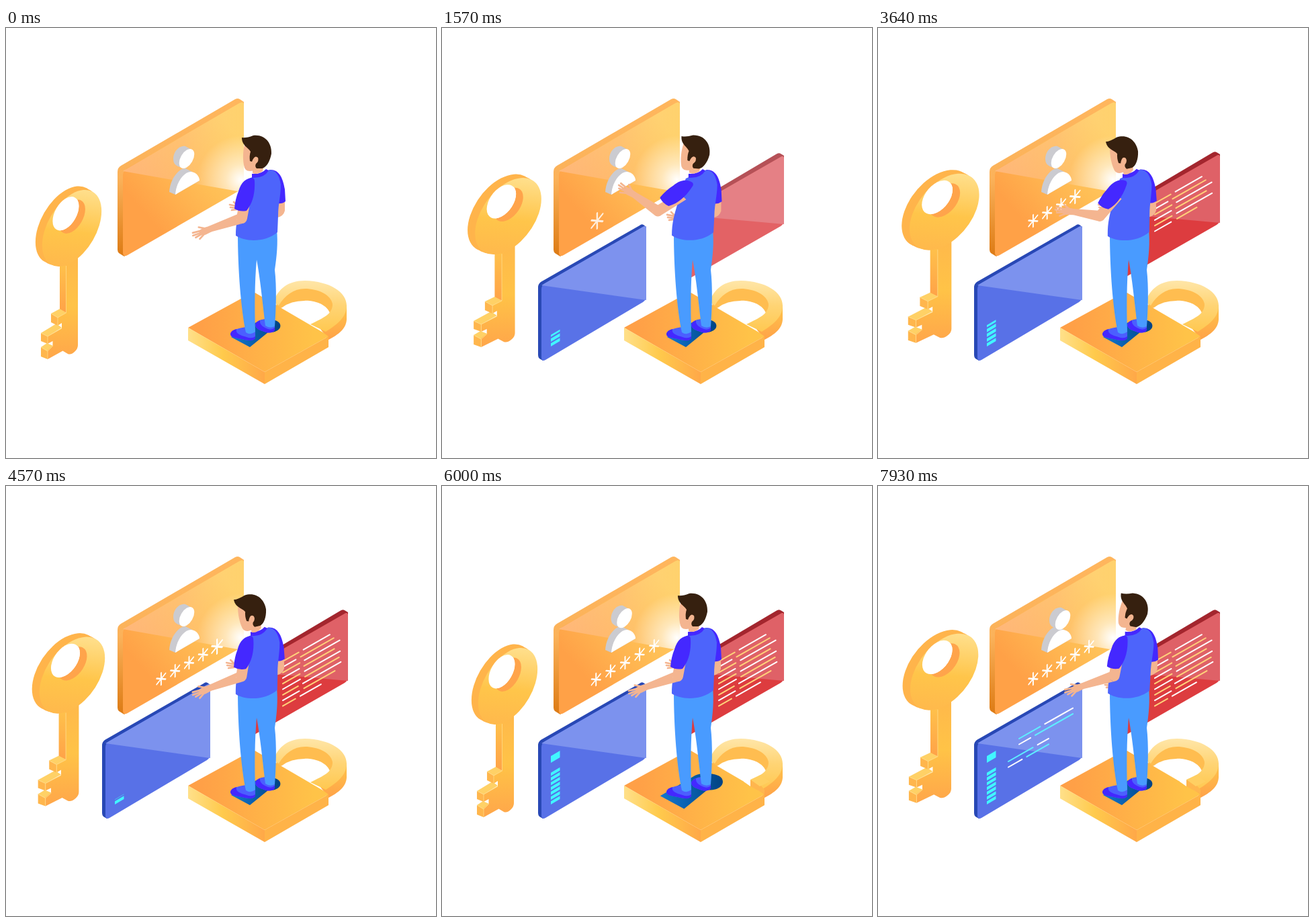
Recreate the animation shown at these times as an HTML page. Size 640 by 640 pixels, loop 8000 ms.

```html
<!DOCTYPE html>
<html lang="en">
<head>
<meta charset="utf-8">
<title>Access cards</title>
<style>
html, body { margin: 0; width: 100%; height: 100%; overflow: hidden; background: #fff; }
svg { display: block; width: 100vw; height: 100vh; }
.line { fill: none; stroke-width: 2; stroke-linecap: round; }
.skin { fill: #f4b590; }
.finger { fill: none; stroke: #f4b590; stroke-width: 2.7; stroke-linecap: round; }
.purple { fill: #4428ff; }
.jersey { fill: #4d64fb; }
.cyan { fill: #41f6ff; }
</style>
</head>
<body>
<svg viewBox="0 0 640 640">
  <defs>
    <linearGradient id="cardFace" gradientUnits="userSpaceOnUse" x1="185" y1="300" x2="345" y2="160">
      <stop offset=".15" stop-color="#ffa147"/><stop offset=".6" stop-color="#ffbe55"/><stop offset="1" stop-color="#ffd06a"/>
    </linearGradient>
    <linearGradient id="cardEdge" x1="0" y1="0" x2="0" y2="1">
      <stop offset="0" stop-color="#ffb65d"/><stop offset=".5" stop-color="#fbb25a"/><stop offset="1" stop-color="#dc7a14"/>
    </linearGradient>
    <radialGradient id="glow" gradientUnits="userSpaceOnUse" cx="350" cy="226" r="66">
      <stop offset="0" stop-color="#fff"/><stop offset=".35" stop-color="#fff" stop-opacity=".55"/><stop offset="1" stop-color="#fff" stop-opacity="0"/>
    </radialGradient>
    <linearGradient id="glare">
      <stop offset="0" stop-color="#ffc8ac" stop-opacity=".5"/><stop offset=".5" stop-color="#ffc090" stop-opacity=".42"/><stop offset="1" stop-color="#ffe08a" stop-opacity=".1"/>
    </linearGradient>
    <linearGradient id="keyFace" x1=".8" y1=".1" x2=".3" y2=".95">
      <stop offset="0" stop-color="#ffdf8c"/><stop offset=".55" stop-color="#ffc54a"/><stop offset="1" stop-color="#ffb94c"/>
    </linearGradient>
    <linearGradient id="shaft" x1="0" y1="0" x2="0" y2="1">
      <stop offset="0" stop-color="#ffb84b"/><stop offset=".5" stop-color="#ffc347"/><stop offset="1" stop-color="#ffa64a"/>
    </linearGradient>
    <linearGradient id="side" x1="0" y1="0" x2="0" y2="1">
      <stop offset="0" stop-color="#ffc64b"/><stop offset="1" stop-color="#ffa248"/>
    </linearGradient>
    <linearGradient id="lockTop">
      <stop offset=".1" stop-color="#ffa047"/><stop offset=".9" stop-color="#ffc348"/>
    </linearGradient>
    <linearGradient id="lockLeft">
      <stop offset="0" stop-color="#ffe08a"/><stop offset=".45" stop-color="#ffca4c"/><stop offset="1" stop-color="#ffa848"/>
    </linearGradient>
    <linearGradient id="shackleTop" x1="0" y1="0" x2="0" y2="1">
      <stop offset="0" stop-color="#ffe6a8"/><stop offset=".5" stop-color="#ffd474"/><stop offset="1" stop-color="#ffc850"/>
    </linearGradient>
    <linearGradient id="hole">
      <stop offset="0" stop-color="#1277d0"/><stop offset="1" stop-color="#004383"/>
    </linearGradient>
    <clipPath id="ringClip"><circle r="22.5"/></clipPath>
  </defs>

  <!-- profile card -->
  <path fill="url(#cardEdge)" d="M166 214Q166 208 171 205L341 106Q345 104 348 106L354 110V200L176 340L168 335Q166 333 166 330Z"/>
  <path fill="url(#cardFace)" d="M174 220Q174 213 180 209L347 112Q354 108 354 114V232Q354 238 349 241L181 338Q174 342 174 334Z"/>
  <path fill="url(#glare)" d="M174 213L347 112Q354 108 354 114V242L345 243Z"/>
  <path fill="url(#glow)" d="M174 213L347 112Q354 108 354 114V238L345 243Z"/>
  <path fill="#cbcbd0" d="M243 244C244 226 256 209 267 209L277 214L288 227L252 248Z"/>
  <path fill="#fff" d="M252 248C253 230 265 213 276 214C284 215 288 222 288 227Z"/>
  <g id="face">
    <path fill="#cbcbd0" d="M249 195C249 183 259 174 267 176L276 181L264 209L256 206Q249 203 249 195Z"/>
    <circle fill="#fff" r="13" transform="matrix(.866 -.5 0 1 269 194.5)"/>
  </g>
  <g id="stars" stroke="#fff" stroke-width="2.2" stroke-linecap="round"></g>

  <g id="key">
    <path fill="url(#side)" d="M80 340L90 350V424L80 419Z"/>
    <path fill="#ffd166" d="M67 425L80 418L90 424L77 431ZM52 454L75 440L83 446L62 459ZM52 475L61 469L70 473L62 481Z"/>
    <path fill="#ffb64d" d="M67 425L77 431V443L67 438ZM52 454L62 459V470L52 466ZM52 475L62 481V493L52 489Z"/>
    <path fill="url(#shaft)" d="M89.5 340V424L77 431V443L83 439V447L62 459V470L69.5 466V473L62 480V493L84.500 480.5L92 485Q97 487 103 481Q107 477 107 472V335Z"/>
    <path fill="none" stroke="#ffdc88" stroke-width=".8" d="M89.5 354V424L77 431V443M83 447L62 459V470M70 473L62 481V493M67 425L77 431M52 454L62 459M52 475L62 481"/>
    <g transform="matrix(.866 -.5 0 1 98 298)">
      <g fill="#ffb44b"><circle r="51.5" cx="-11" cy="-10.5"/><circle r="51.5" cx="-5.5" cy="-5"/></g>
      <circle r="51" fill="url(#keyFace)"/>
      <g transform="translate(.5 -17)">
        <circle r="22.5" fill="#ffa44b"/>
        <circle r="22.5" cx="-11" cy="-10" fill="#fff" clip-path="url(#ringShift)"/>
        <g clip-path="url(#ringClip)"><circle r="22.5" cx="-11" cy="-10" fill="#fff"/></g>
      </g>
    </g>
  </g>

  <g id="blueCard">
    <path fill="#2848b5" d="M143 386Q143 381 147 378L294 294Q297 291 300 293L304 296V390L150 495L145 492Q143 490 143 487Z"/>
    <path fill="#5871e7" d="M148 389Q148 383 153 380L299 296Q304 293 304 298V399Q304 405 299 408L154 494Q148 497 148 490Z"/>
    <path fill="#7c92ee" d="M148 383L299 296Q304 293 304 298V405Z"/>
    <g id="bars" class="cyan"></g>
    <path id="bigBar" class="cyan" d="M162 402L175.5 394V404L162 412Z"/>
    <g id="blueLines"></g>
  </g>

  <g id="redCard">
    <path fill="#a3262e" d="M350 273L497 186Q501 183 504 185L509 188V280L354 378H350Z"/>
    <path fill="#dd3c3f" d="M354 276L504 190Q509 187 509 193V284Q509 290 504 293L354 379Z"/>
    <path fill="#df6167" d="M354 276L504 190Q509 187 509 193V290Z"/>
    <g id="redLines"></g>
  </g>

  <!-- padlock -->
  <path fill="url(#side)" d="M507 412V434C506 448 495 456 480 464L468 448Z"/>
  <path fill="#ffbd50" d="M402 420L403 402C425 380 470 384 487 402Q488 418 482 424C476 409 454 405 444 406Q424 406 411 416Z"/>
  <path fill="url(#shackleTop)" d="M398 408C405 388 420 376 445 376C482 377 507 393 507 413C507 432 490 443 476 452L453 441C473 431 486 426 486 411C484 397 464 388 445 388C428 388 415 398 406 413Z"/>
  <path fill="url(#lockTop)" d="M271 446L366 394Q370 393 374 396L470 452L480 459L385 512Z"/>
  <path fill="url(#lockLeft)" d="M271 446L385 512V530L271 465Z"/>
  <path fill="#ffb348" d="M385 512L480 459V475L385 530Z"/>
  <g id="shackleEnd">
    <path fill="#fff" d="M449 440L459 434V447Z"/>
    <path fill="#ffb64e" d="M459 437L473 444L480 452V458L474 455L459 447Z"/>
    <path fill="#ffcf62" d="M459 437L474 430L488 440L473 447Z"/>
  </g>
  <path id="keyhole" fill="url(#hole)" d="M335 460L376 436C384 432 402 433 407 439C412 447 403 454 390 453L363 475Z"/>

  <!-- person -->
  <path fill="#4b5fff" d="M334 455C336 449 346 447 357 445L371 452V461Q368 467 355 464C345 461 334 462 334 455ZM371 441C374 435 380 434 386 433L400 443V449Q397 455 387 453C380 450 371 449 371 441Z"/>
  <path class="purple" d="M334 455Q335 450 343 448C341 456 352 458 358 460Q366 463 371 459V462Q368 467 355 464C345 461 334 462 334 455ZM371 441Q373 437 378 435C377 443 385 446 390 448Q396 450 400 446V450Q397 455 387 453C380 450 371 449 371 441Z"/>
  <path id="backHand" class="finger" d="M0 0L10 2L26 1M1 4L11 5L26 3M3 8L11 7M6 -4L12 2"/>
  <path fill="#499bff" d="M345 304L403 300C405 320 403 340 400 360C403 385 402 420 400 444Q393 448 386 443C382 410 378 370 373 345C370 380 370 415 371 452Q364 458 357 453C350 420 345 360 345 304Z"/>
  <g id="torso">
    <path class="skin" d="M404 256L415 255V272Q413 280 404 282Z"/>
    <path class="purple" d="M392 211C406 210 412 222 415 240L416 258Q411 262 404 261L400 230Z"/>
    <path class="jersey" d="M362 224L392 211C402 211 407 220 409 233C409 250 405 262 405 280L404 304C385 320 355 318 342 309C342 290 345 280 350 262Z"/>
    <path class="purple" d="M366 217Q380 218 387 210L391 212Q384 224 366 223Z"/>
    <g id="head">
      <path class="skin" d="M367 204L384 204L382 213Q374 219 367 216Z"/>
      <path class="skin" d="M356 170C353 180 352 192 354 204Q355 213 363 213L375 212L382 190L367 172Z"/>
      <path fill="#36200f" d="M351 163Q358 164 368 160C386 158 396 172 395 187C393 199 387 208 381 209H373Q370 206 372 202Q377 198 375 193Q370 188 366 199L363 198Q362 190 364 184C360 177 351 175 351 163Z"/>
    </g>
    <path id="arm" class="skin"/>
    <g id="hand">
      <path class="skin" d="M-2 -4.5L8 -5L15 -3L16 4L8 6L-2 4.5Z"/>
      <path class="finger" d="M13 -2L25 -3M14 1L26 1M13 3L23 5M9 4L18 9M7 -4L14 -8"/>
    </g>
    <path id="sleeve" class="purple" d="M367 223C358 223 350 229 346 243Q341 255 340 269Q348 274 358 272C366 262 371 248 370 228Q370 224 367 223Z"/>
  </g>
</svg>
<script>
const LOOP = 8000;
const SLOPE = .568;
const $ = id => document.getElementById(id);
const clamp = v => Math.max(0, Math.min(1, v));
const ramp = (t, start, length) => clamp((t - start) / length);
const easeOut = u => 1 - (1 - u) ** 3;
const smooth = u => u * u * (3 - 2 * u);
const mix = (a, b, u) => a + (b - a) * u;
const arch = (t, start, length) => Math.sin(Math.PI * ramp(t, start, length));
const place = (id, transform) => $(id).setAttribute('transform', transform);
const fade = (id, opacity) => $(id).setAttribute('opacity', opacity);

function addPath(parent, attributes = {}) {
  const path = document.createElementNS('http://www.w3.org/2000/svg', 'path');
  for (const name in attributes) path.setAttribute(name, attributes[name]);
  return $(parent).appendChild(path);
}

const POSES = { // elbow and fingertip
  rest: [351, 283, 278, 308],
  reach: [321, 273, 263, 234],
  type: [331, 279, 265, 267]
};
const ACTIONS = [
  { at: 0, pose: 'rest', turn: 0 }, { at: 860, pose: 'reach', turn: 9 },
  { at: 2430, pose: 'reach', turn: 0 }, { at: 3640, pose: 'type', turn: -12 },
  { at: 4570, pose: 'rest', turn: -12 }, { at: 6000, pose: 'rest', turn: 0 },
  { at: LOOP, pose: 'rest', turn: 10 }
];

const stars = Array.from({ length: 5 }, (_, i) => ({
  node: addPath('stars', { d: 'M0-9V9M-7.6-4.4L7.6 4.4M-7.6 4.4L7.6-4.4' }),
  offset: i - 2,
  start: 1350 + 250 * i + 115 * i * i
}));
const bars = Array.from({ length: 7 }, (_, i) => ({ node: addPath('bars'), base: 474 - i * 7.1 }));

// One slanted row of text: two strokes, y is taken at the left end.
function addRow(parent, colors, x, y, width, split) {
  const stroke = (color, from, to) => addPath(parent, {
    class: 'line', stroke: color, pathLength: 1,
    d: `M${x + from} ${y - from * SLOPE}L${x + to} ${y - to * SLOPE}`
  });
  const gap = width * split;
  return [stroke(colors[0], 0, gap - 3), stroke(colors[1], gap + 4, width)];
}

let seed = 7;
const random = () => (seed = seed * 16807 % 2147483647) / 2147483647;
const WHITE = '#fff', YELLOW = '#ffd27a', CYAN = '#5ef0ff';
const redLines = Array.from({ length: 9 }, (_, i) => addRow(
  'redLines', i % 2 ? [WHITE, YELLOW] : [YELLOW, WHITE],
  412, 261 + 8.3 * i, i === 8 ? 62 : 70 + 20 * random(), .27 + .12 * random())).flat();
const blueLines = [0, 1].flatMap(block => {
  const x = 210 - 16 * block, y = 376 + 34 * block, width = 80 - 20 * block;
  return [...addRow('blueLines', [CYAN, WHITE], x, y, width, .43 + .23 * block),
    ...addRow('blueLines', [WHITE, CYAN], x, y + 8.5, width, .25 + .14 * block)];
});

function revealLines(lines, t, start, step) {
  lines.forEach((line, i) => {
    const shown = easeOut(ramp(t, start + i * step, 400));
    line.style.strokeDasharray = `${shown} 2`;
    line.style.visibility = shown ? 'visible' : 'hidden';
  });
}

function drawArm([ex, ey, hx, hy]) {
  const angle = Math.atan2(hy - ey, hx - ex), reach = Math.hypot(hx - ex, hy - ey) - 26;
  const dx = Math.cos(angle), dy = Math.sin(angle);
  const wx = ex + dx * reach, wy = ey + dy * reach;
  const bend = Math.atan2(358 - ex, ey - 233);
  const ux = Math.cos(bend) * 8, uy = Math.sin(bend) * 8;
  $('arm').setAttribute('d',
    `M${357 - ux} ${250 - uy}L${ex - ux} ${ey - uy}A8 8 0 0 0 ${ex + ux} ${ey + uy}L${357 + ux} ${250 + uy}Z` +
    `M${ex - dy * 8} ${ey + dx * 8}L${wx - dy * 4.5} ${wy + dx * 4.5}L${wx + dy * 4.5} ${wy - dx * 4.5}` +
    `L${ex + dy * 8} ${ey - dx * 8}A8 8 0 0 1 ${ex - dy * 8} ${ey + dx * 8}Z`);
  place('hand', `translate(${wx} ${wy}) rotate(${angle * 180 / Math.PI}) scale(1 -1)`);
  place('sleeve', `rotate(${bend * 180 / Math.PI - 8} 358 235)`);
}

function drawPerson(t) {
  const next = ACTIONS.findIndex(action => action.at > t);
  const from = ACTIONS[next - 1], to = ACTIONS[next];
  const u = smooth(ramp(t, from.at, to.at - from.at));
  const turn = mix(from.turn, to.turn, u);
  drawArm(POSES[from.pose].map((value, i) => mix(value, POSES[to.pose][i], u)));
  place('torso', `rotate(${turn * .1} 375 315)`);
  place('head', `rotate(${turn * .9} 376 213)`);
  place('backHand', `translate(${333 + turn * .4} ${263 + Math.max(0, turn) * 2.9})`);
}

function drawCards(t) {
  fade('blueCard', easeOut(ramp(t, 200, 1700)));
  place('blueCard', `translate(0 ${22 * (1 - easeOut(ramp(t, 200, 660)))})`);
  const settle = ramp(t, 850, 2600);
  fade('redCard', ramp(t, 850, 900));
  place('redCard', `translate(0 ${13 * (1 - settle) ** .6 * Math.cos(5 * settle)})`);
  revealLines(redLines, t, 2000, 140);
  revealLines(blueLines, t, 6100, 170);

  const level = Math.max(5.6 * arch(t, 1000, 3800), 7 * ramp(t, 4800, 1100));
  bars.forEach(({ node, base }, i) => {
    const height = 4.7 * clamp((level - i) * 1.2);
    node.setAttribute('d', height ? `M162 ${base}L175.5 ${base - 8}v${-height}L162 ${base - height}Z` : '');
  });
  fade('bigBar', ramp(t, 5500, 300));
}

function draw(t) {
  const lift = Math.abs(Math.sin(Math.PI * t / 6000)) ** 1.2;
  place('key', `translate(93.5 ${-26 * lift}) scale(${1 + .19 * lift ** 1.3} 1) translate(-93.5 0)`);

  const pulse = arch(t, 5400, 1200), spread = 1 + .04 * pulse;
  stars.forEach(({ node, offset, start }) => {
    const u = ramp(t, start, 650);
    node.setAttribute('opacity', clamp(u * 2.4));
    node.setAttribute('transform', `translate(${272.5 + offset * 20.8 * spread} ${263 - offset * 12 * spread})` +
      ` matrix(.866 -.5 0 1 0 0) scale(${mix(1.4, 1, u)})`);
  });
  const shift = ramp(t, 4570, 3360);
  place('face', `translate(${6 * shift} ${5 * shift})`);
  place('keyhole', `translate(373 455) scale(${1 + .27 * pulse}) translate(-373 -455)`);
  fade('shackleEnd', ramp(t, 5200, 500));
  drawCards(t);
  drawPerson(t);
}

const start = performance.now();
function frame() {
  draw((performance.now() - start) % LOOP);
  requestAnimationFrame(frame);
}
draw(0);
requestAnimationFrame(frame);
</script>
</body>
</html>
```
